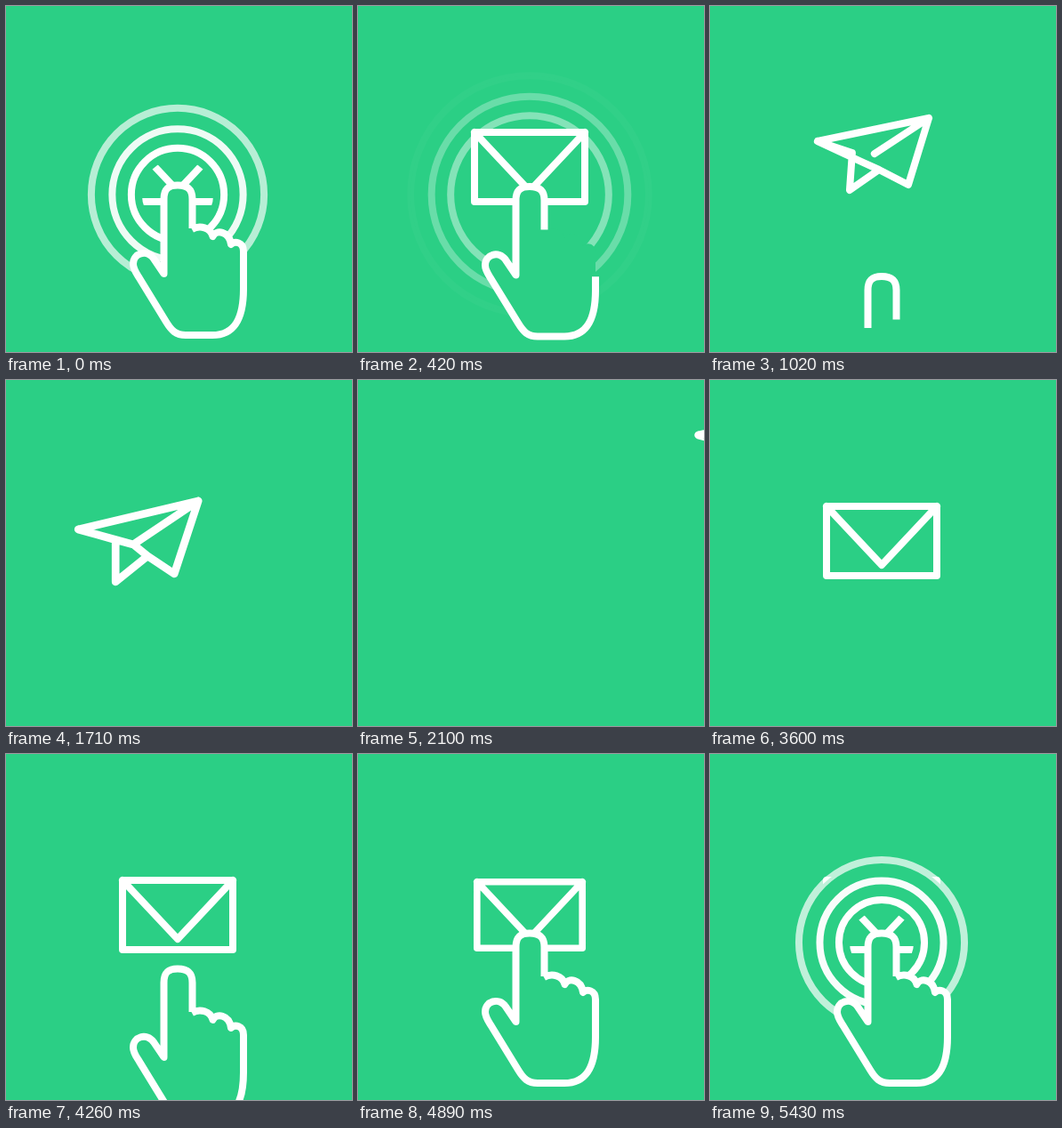
These frames come from a looping animation (389x389 px, 5460 ms). An HTML page:

```html
<!DOCTYPE html>
<html lang="en">
<head>
<meta charset="utf-8">
<title>Tap to send</title>
<style>
  html, body { margin: 0; width: 100%; height: 100%; overflow: hidden; background: #2bcf85; }
  svg { display: block; width: 100%; height: 100%; }
  path, circle { fill: none; stroke: #fff; stroke-width: 8; stroke-linejoin: round; }
  #mail, #plane { stroke-linecap: round; }
  #disk, #hand .body { fill: #2bcf85; stroke: none; }
</style>
</head>
<body>
<svg viewBox="0 0 389 389">
  <defs><clipPath id="reveal"><circle id="hole" cx="193" cy="212" r="0"/></clipPath></defs>
  <path id="mail"/>
  <circle id="disk" cx="193" cy="212" r="0"/>
  <g id="rings">
    <circle cx="193" cy="212"/><circle cx="193" cy="212"/><circle cx="193" cy="212"/>
  </g>
  <g clip-path="url(#reveal)"><path id="plane"/></g>
  <g id="hand"><path class="body"/><path class="line"/></g>
</svg>
<script>
const LOOP = 5460;
const $ = s => document.querySelector(s);
const mail = $('#mail'), plane = $('#plane'), disk = $('#disk'), hole = $('#hole');
const hand = $('#hand'), body = $('.body'), line = $('.line');
const rings = [...document.querySelectorAll('#rings circle')];

const handPath = 'M209.500 250V217C209.500 206 204 201.500 193 201.500S177.500 206 177.500 217V301' +
  'L166 284C158 273 143 278 143 290C143 296 147 301 150 306L180 355C186 365 191 370 202 370' +
  'H232C258 370 267 350 267 318V276C267 265 257 264 253 268C251 253 236 251 232.500 259' +
  'C230 249 218 246 209 251';
body.setAttribute('d', handPath);
line.setAttribute('d', handPath);
const handLength = line.getTotalLength();

const linear = p => p;
const inOut = p => (1 - Math.cos(Math.PI * p)) / 2;
const out = p => 1 - (1 - p) ** 1.6;
const clamp = (v, a, b) => Math.min(b, Math.max(a, v));

// keys: [time, value, easing into that value]
function track(keys, t) {
  if (t <= keys[0][0]) return keys[0][1];
  for (let i = 1; i < keys.length; i++) {
    const [t1, b, ease = inOut] = keys[i], [t0, a] = keys[i - 1];
    if (t <= t1) {
      const p = ease((t - t0) / (t1 - t0));
      return Array.isArray(a) ? a.map((v, k) => v + (b[k] - v) * p) : a + (b - a) * p;
    }
  }
  return keys[keys.length - 1][1];
}

// Corner pairs: left, nose, bottom, crossing, wing tip, wing top, fold, crease end
const closedMail = [131,142, 255,142, 255,220, 193,220, 131,220, 131,181, 193,208, 193,208];
const folding = [121,152, 246,126, 223,201, 190,184, 157,207, 160,165, 172,176, 185,166];
const glider = [81,168, 216,136, 189,218, 159,198, 123,227, 123,180, 143,185, 143,185];
const shift = (pose, dx, dy) => pose.map((v, i) => v + (i % 2 ? dy : dx));

const planeKeys = [
  [480, closedMail],
  [1020, folding],
  [1170, shift(glider, 29, -13), out],
  [1600, shift(glider, -7, 4)],
  [1710, glider, p => p * p],
  [2120, shift(glider, 330, -116), p => 0.25 * p + 0.75 * p ** 2.2]
];
const handY = [[350, 0], [600, 18, p => p * p], [1020, 102, linear], [1130, 150, linear]];
const handTrim = [[280, handLength], [600, 285], [1020, 128, linear], [1130, 0, linear]];
const handIn = [[3700, 195], [4500, 0]];
const drop = [[2910, -230], [3120, 5, out], [3330, 0]];
const flap = [[3330, 142], [3580, 208]];
const press = [[4680, 1], [4860, 0.955], [4980, 0.955], [5200, 1]];

function outline(p) {
  const at = i => p[2 * i].toFixed(2) + ' ' + p[2 * i + 1].toFixed(2);
  return `M${[0, 1, 2, 3, 4, 5].map(at).join('L')}Z` +
    `M${at(0)}L${at(6)}L${at(3)}M${at(7)}L${at(1)}`;
}

function show(el, on) { el.style.display = on ? '' : 'none'; }

function drawMail(t) {
  show(mail, t >= 2910);
  const y = track(flap, t), s = track(press, t);
  mail.setAttribute('d', `M131 142H255V220H131ZM131 142L193 ${y}L255 142`);
  mail.setAttribute('transform',
    `translate(193 ${180.5 + track(drop, t)}) scale(${s}) translate(-193 -180.5)`);
}

function drawRipple(u) {
  const active = u > -530 && u < 720;
  const v = Math.min(u, 617);
  const r = active ? Math.max(0, 97 + 0.133 * v - 0.000108 * v * v) : 0;
  show(disk, active);
  disk.setAttribute('r', r);
  rings.forEach((ring, i) => {
    const radius = r - [0, 23.5, 45][i];
    show(ring, active && radius > 0);
    ring.setAttribute('r', Math.max(0, radius));
    ring.setAttribute('opacity', clamp([0.66, 0.92, 1.05][i] - 0.0015 * u, 0, 1));
  });
  const spread = u > 600 ? 900 : Math.max(0, r - 57) + track([[200, 0], [600, 50]], u);
  hole.setAttribute('r', active || u > 0 ? spread : 0);
}

function drawPlane(u) {
  show(plane, u > -530 && u < 2125);
  plane.setAttribute('d', outline(track(planeKeys, u)));
  plane.style.strokeWidth = track([[1020, 8], [1200, 8.7]], u);
}

function drawHand(t) {
  const leaving = t < 2500;
  show(hand, leaving ? t < 1130 : t > 3700);
  hand.setAttribute('transform', `translate(0 ${track(leaving ? handY : handIn, t)})`);
  const len = leaving ? track(handTrim, t) : handLength;
  line.setAttribute('stroke-dasharray', len < handLength ? `${len} 2000` : 'none');
  show(body, !leaving || t < 600);
}

function draw(now) {
  const t = now % LOOP;
  const u = t < 2500 ? t : t - LOOP;
  drawMail(t);
  drawRipple(u);
  drawPlane(u);
  drawHand(t);
}

const start = performance.now();
function frame() {
  draw(performance.now() - start);
  requestAnimationFrame(frame);
}
frame();
</script>
</body>
</html>
```
